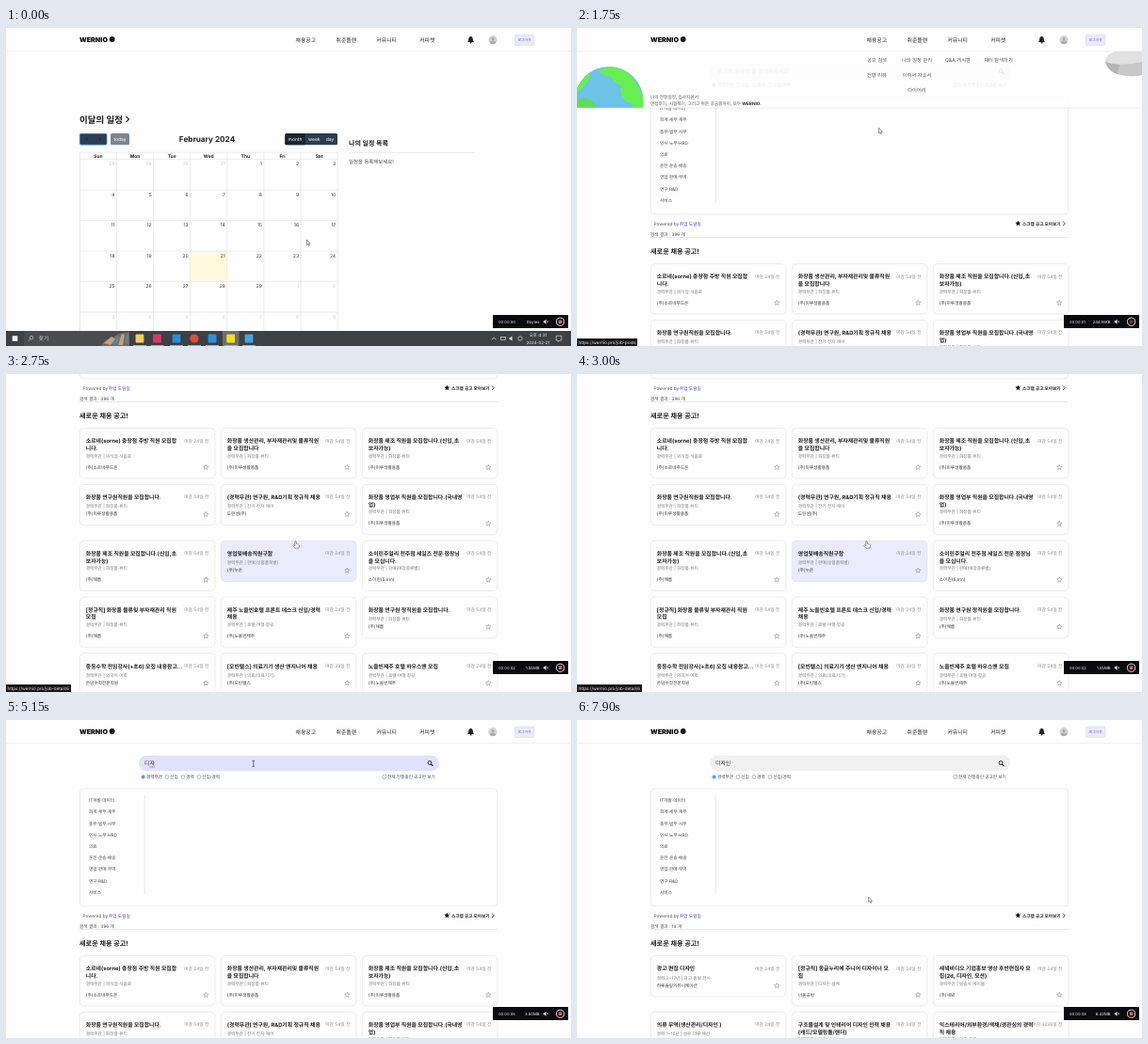
An HTML page for the animation above (8 s loop, 600x338 px).

```html
<!DOCTYPE html>
<html lang="ko">
<head>
<meta charset="utf-8">
<title>Job board walkthrough</title>
<style>
html, body { margin: 0; width: 100%; height: 100%; overflow: hidden; background: #fefefe; }
svg { display: block; width: 100vw; height: 100vh; }
text { font-family: Inter, 'Noto Sans CJK KR', 'Noto Sans CJK', sans-serif; white-space: pre; text-rendering: geometricPrecision; }
</style>
</head>
<body>
<svg id="stage" viewBox="0 0 600 338"></svg>
<script>
const LOOP = 8000, BRAND = 'WERNIO', SITE = 'https://wernio.pro/';
const stage = document.getElementById('stage');

// Drawing helpers
function add(parent, tag, attrs = {}) {
  const node = document.createElementNS('http://www.w3.org/2000/svg', tag);
  for (const k in attrs) node.setAttribute(k, attrs[k]);
  parent.appendChild(node);
  return node;
}
const group = (p, attrs) => add(p, 'g', attrs);
const rect = (p, x, y, width, height, fill, more) => add(p, 'rect', { x, y, width, height, fill, ...more });
const circle = (p, cx, cy, r, fill, more) => add(p, 'circle', { cx, cy, r, fill, ...more });
const path = (p, d, fill = 'none', more) => add(p, 'path', { d, fill, ...more });
const line = (p, d, stroke, width = 0.6) => path(p, d, 'none', { stroke, 'stroke-width': width });
// y is the middle of the line of text
function label(p, x, y, str, size, fill = '#333', weight = 400, anchor = 'start') {
  const node = add(p, 'text', { x, y: y + size * 0.37, 'font-size': size, fill, 'font-weight': weight, 'text-anchor': anchor });
  node.textContent = str;
  return node;
}
function star(p, cx, cy, r, fill, more) {
  const pts = Array.from({ length: 10 }, (_, i) => {
    const a = i * Math.PI / 5 - Math.PI / 2, q = i % 2 ? r * 0.48 : r;
    return (cx + q * Math.cos(a)).toFixed(2) + ',' + (cy + q * Math.sin(a)).toFixed(2);
  });
  return add(p, 'polygon', { points: pts.join(' '), fill, ...more });
}

// Timing helpers
const show = (node, on) => node.setAttribute('display', on ? 'inline' : 'none');
const move = (node, x, y) => node.setAttribute('transform', `translate(${x} ${y})`);
const held = (table, t) => table.filter(row => row[0] <= t).pop()[1];
const within = (t, a, b) => t >= a && t < b;
function eased(keys, t, col = 1) {
  const i = keys.findIndex(k => k[0] > t);
  if (i < 0) return keys[keys.length - 1][col];
  if (i === 0) return keys[0][col];
  const a = keys[i - 1], b = keys[i], u = (t - a[0]) / (b[0] - a[0]);
  return a[col] + (b[col] - a[col]) * u * u * (3 - 2 * u);
}

// Calendar page
const calendar = group(stage);
function buildCalendar(p) {
  label(p, 78, 97, '이달의 일정', 9.5, '#1a1a1a', 700);
  line(p, 'M127.5 94l3 3-3 3', '#222', 1.1);
  rect(p, 78.4, 112.3, 28.6, 11.8, '#2c3e50', { rx: 1.5, stroke: '#3f83bd', 'stroke-width': 0.9 });
  line(p, 'M86.5 116.5l-1.6 1.7 1.6 1.7M99 116.5l1.6 1.7-1.6 1.7', '#17222c', 0.8);
  rect(p, 111, 112, 20, 12.3, '#7d868f', { rx: 1.5 });
  label(p, 121, 118, 'today', 5, '#fff', 400, 'middle');
  label(p, 213.5, 118.3, 'February 2024', 8.2, '#222', 700, 'middle');
  rect(p, 296.3, 112, 55.7, 12.3, '#2c3e50', { rx: 1.5 });
  rect(p, 296.3, 112, 21.4, 12.3, '#1a252f', { rx: 1.5 });
  [['month', 307], ['week', 327.3], ['day', 344]].forEach(([s, x]) => label(p, x, 118, s, 5, '#fff', 400, 'middle'));

  const left = 78.4, cw = 39.1, top = 139.6, rh = 32.5;
  rect(p, left + 3 * cw, top + 3 * rh, cw, rh, '#fffadf');
  let grid = '';
  for (let c = 0; c < 8; c++) grid += `M${left + c * cw} 132.3V${top + 6 * rh}`;
  for (let r = 0; r < 7; r++) grid += `M${left} ${top + r * rh}h${7 * cw}`;
  line(p, grid + `M${left} 132.3h${7 * cw}`, '#dedede', 0.55);
  'Sun Mon Tue Wed Thu Fri Sat'.split(' ').forEach((d, c) =>
    label(p, left + (c + 0.5) * cw, 136, d, 4.9, '#222', 700, 'middle'));
  for (let i = 0; i < 42; i++) {
    const n = i - 3, inside = n > 0 && n < 30;
    const day = n < 1 ? 31 + n : inside ? n : n - 29;
    label(p, left + (i % 7 + 1) * cw - 2, top + Math.floor(i / 7) * rh + 4.6, day, 5, inside ? '#333' : '#cfcfcf', 400, 'end');
  }
  label(p, 364, 122, '나의 일정 목록', 7, '#1a1a1a', 700);
  line(p, 'M364 132.5h133', '#e2e2e2');
  label(p, 364, 142.5, '일정을 등록해보세요!', 5.4, '#444');
}
buildCalendar(calendar);

// Job search page
const jobs = group(stage);
const bar = rect(jobs, 141, 37.8, 319, 16.4, '#f0f0f0', { rx: 8.2 });
const typed = label(jobs, 147, 46, '', 5.9, '#333');
const composing = line(jobs, 'M158 50h5.4', '#444', 0.5);
const caret = line(jobs, 'M147.2 42.3v7.4', '#111', 0.6);
circle(jobs, 450, 45.5, 1.9, 'none', { stroke: '#111', 'stroke-width': 0.9 });
line(jobs, 'M451.4 46.9l2 2', '#111', 1.1);

function buildFilters(p) {
  [['경력무관', 145.6], ['신입', 171], ['경력', 188], ['신입/경력', 205]].forEach(([s, x], i) => {
    circle(p, x, 60.5, 1.9, '#fff', { stroke: i ? '#777' : '#1a73e8', 'stroke-width': 0.5 });
    if (!i) circle(p, x, 60.5, 1.2, '#1a73e8');
    label(p, x + 3.3, 60.5, s, 4.65, '#444');
  });
  rect(p, 400, 58.4, 3.8, 3.8, '#fff', { rx: 0.6, stroke: '#777', 'stroke-width': 0.5 });
  label(p, 405, 60.5, '현재 진행중인 공고만 보기', 4.65, '#444');
  rect(p, 78.4, 73, 443.4, 125, 'none', { rx: 4, stroke: '#e5e5e5', 'stroke-width': 0.7 });
  ['IT개발·데이터', '회계·세무·재무', '총무·법무·사무', '인사·노무·HRD', '의료', '운전·운송·배송', '영업·판매·무역', '연구·R&D', '서비스']
    .forEach((s, i) => label(p, 88, 85.5 + 12.2 * i, s, 4.7, '#444'));
  line(p, 'M147.2 80v105', '#dcdcdc');
  label(p, 81.5, 207.8, 'Powered by', 4.8, '#555');
  label(p, 109, 207.8, '취업 도람길', 4.7, '#4a3fd0', 500);
  star(p, 468.3, 207.7, 3, '#111');
  label(p, 473, 207.8, '스크랩 공고 모아보기', 4.65, '#222', 700);
  line(p, 'M516 205.5l2.2 2.3-2.2 2.3', '#222', 0.8);
  line(p, 'M78 222.6h444', '#dcdcdc', 0.6);
  label(p, 78, 237, '새로운 채용 공고!', 7.15, '#222', 700);
}
buildFilters(jobs);
const count = label(jobs, 78, 219.6, '', 4.7, '#444');

function buildCards(rows) {
  const g = group(jobs);
  const boxes = rows.map(([title, sub, firm, days], i) => {
    const card = group(g, { transform: `translate(${78.3 + i % 3 * 150} ${250.6 + Math.floor(i / 3) * 59.8})` });
    const lines = title.split('\n'), tall = lines.length > 1;
    const box = rect(card, 0, 0, 143.6, tall ? 53.3 : 43.5, '#fefefe', { rx: 4.5, stroke: '#e6e6e6', 'stroke-width': 0.7 });
    lines.forEach((s, n) => label(card, 6.5, 13.6 + n * 7.7, s, 5.85, '#1c1c1c', 700));
    label(card, 6.5, tall ? 29.2 : 23.2, sub, 4.65, '#777');
    label(card, 6.5, tall ? 41.2 : 31.2, firm, 4.7, '#333');
    label(card, 137, 13.2, `마감 ${days}일 전`, 4.75, '#888', 400, 'end');
    star(card, 134, tall ? 41.6 : 31.8, 2.8, 'none', { stroke: '#777', 'stroke-width': 0.5 });
    return box;
  });
  return { g, boxes };
}
const ANY = '경력무관 | ', BEAUTY = ANY + '화장품·뷰티', LIFE = '(주)미루생활용품', DAY = '(주)해름';
const all = buildCards([
  ['소르네(sorne) 충장점 주방 직원 모집합\n니다.', ANY + '외식업·식음료', '(주)소르네푸드온', 24],
  ['화장품 생산관리, 부자재관리및 물류직원\n을 모집합니다', BEAUTY, LIFE, 54],
  ['화장품 제조 직원을 모집합니다.(신입,초\n보자가능)', BEAUTY, LIFE, 54],
  ['화장품 연구원직원을 모집합니다.', BEAUTY, LIFE, 54],
  ['(경력무관) 연구원, R&D기획 정규직 채용', ANY + '전기·전자·제어', '도린셈(주)', 54],
  ['화장품 영업부 직원을 모집합니다.(국내영\n업)', BEAUTY, LIFE, 54],
  ['화장품 제조 직원을 모집합니다.(신입,초\n보자가능)', BEAUTY, DAY, 54],
  ['영업및배송직원구함', ANY + '판매(상품품목별)', '(주)누온', 24],
  ['소이린주얼리 전주점 세일즈 전문 점장님\n을 모십니다.', ANY + '판매(매장종류별)', '소이린(S.Irin)', 54],
  ['[정규직] 화장품 물류및 부자재관리 직원\n모집', BEAUTY, DAY, 54],
  ['제주 노을빈호텔 프론트 데스크 신입/경력\n채용', ANY + '호텔·여행·항공', '(주)노을빈제주', 24],
  ['화장품 연구원 정직원을 모집합니다.', BEAUTY, DAY, 54],
  ['중등수학 전임강사(+초6) 모집 내용참고...', ANY + '외국어·어학', '온담수학전문학원', 54],
  ['[모빈텔스] 의료기기 생산 엔지니어 채용', ANY + '의료(의료기기)', '(주)모빈텔스', 39],
  ['노을빈제주 호텔 하우스맨 모집', ANY + '호텔·여행·항공', '(주)노을빈제주', 24]
]);
const found = buildCards([
  ['광고 편집 디자인', '경력 2~17년 | 광고·홍보·전시', '하루솔잎커뮤니케이션', 24],
  ['[정규직] 몽글누리에 주니어 디자이너 모\n집', ANY + '디자인·설계', '너울공방', 24],
  ['새녘비디오 기업홍보 영상 후반편집자 모\n집(2d, 디자인, 모션)', ANY + '방송사·케이블', '(주)새녘', 24],
  ['의류 무역(생산관리/디자인 )', '경력 1~10년 | 섬유·의류·패션', '(주)가람결', 24],
  ['구조물설계 및 인테리어 디자인 인력 채용\n(캐드/모델링툴/렌더)', ANY + '건축·설비', '(주)온결', 24],
  ['익스테리어/외부환경/색채/경관심의 경력\n직 채용', ANY + '건축·환경', '(주)다온결', 3236]
]);

// Drop-down menu, under the header
const header = group(stage);
const menu = group(header);
function buildMenu(p) {
  add(add(p, 'clipPath', { id: 'menuClip' }), 'rect', { x: 0, y: 0, width: 600, height: 85 });
  add(add(p, 'clipPath', { id: 'globeClip' }), 'circle', { cx: 34, cy: 77.5, r: 36.5 });
  rect(p, 0, 25, 600, 60, '#fefefe');
  const art = group(group(p, { 'clip-path': 'url(#menuClip)' }), { 'clip-path': 'url(#globeClip)' });
  rect(art, -3, 40, 76, 76, '#5cbbe6');
  path(art, 'M34 40Q62 42 72 80V88H63Q60 80 52 78Q44 70 47 62Q40 58 36 52Q28 50 22 46Z', '#55ee3c');
  path(art, 'M-3 58Q5 50 13 46Q16 52 10 58Q7 65 0 68L-3 69Z', '#55ee3c');
  path(art, 'M-3 78Q6 72 14 76Q20 79 22 88H-3Z', '#4fd64a');
  // tilted stone-like solid on the right
  path(p, 'M561 36Q562 28 572 25H600V50Q588 53 574 49Q563 45 561 36Z', '#c2c2c2');
  path(p, 'M561 36Q576 41 600 36V25H572Q562 28 561 36Z', '#dedede');
  path(p, 'M561 36Q568 39 576 39L574 49Q563 45 561 36Z', '#adadad');
  [['공고 검색', 318.5, 0], ['전형 리뷰', 318.5, 1], ['나의 일정 관리', 361, 0], ['이력서·자소서', 361, 1],
   ['다이어리', 361, 2], ['Q&A 게시판', 404.3, 0], ['채티 탐색하기', 447.5, 0]]
    .forEach(([s, x, row]) => label(p, x, 34 + row * 16, s, 5.3, '#444', 400, 'middle'));
  label(p, 78, 73, '나의 전형일정, 입사지원서', 4.65, '#444');
  const claim = label(p, 78, 80.1, '면접후기, 시험복기, 그리고 취준 궁금증까지, 모두 ', 4.65, '#444');
  const name = add(claim, 'tspan', { 'font-weight': 700, fill: '#111' });
  name.textContent = BRAND + '.';
  line(p, 'M0 85h600', '#dcdcdc');
}
buildMenu(menu);

function buildHeader(p) {
  rect(p, 0, 0, 600, 24.8, '#fefefe');
  line(p, 'M0 24.8h600', '#e2e2e2');
  label(p, 78, 12, BRAND, 7.15, '#0c0c0c', 900);
  circle(p, 112.7, 12, 2.9, '#111');
  [['채용공고', 318.3], ['취준플랜', 361.3], ['커뮤니티', 404.2], ['커피챗', 447.3]]
    .forEach(([s, x]) => label(p, x, 12.6, s, 5.85, '#222', 400, 'middle'));
  path(p, 'M490 15q1.2-1.2 1.2-3.3q0-2.6 2.3-2.9q2.3.3 2.3 2.9q0 2.1 1.2 3.3Z', '#222');
  circle(p, 493.5, 15.7, 0.9, '#222');
  circle(p, 517, 12.7, 4.6, '#d3d3d3');
  circle(p, 517, 11.5, 1.6, '#a9a9a9');
  path(p, 'M513.8 15.7q.4-2.2 3.2-2.2t3.2 2.2q-3.2 2.4-6.4 0Z', '#a9a9a9');
  rect(p, 540.2, 7, 20.8, 11.6, '#ebebf8', { rx: 1.8, stroke: '#d8d7e8', 'stroke-width': 0.5 });
  label(p, 550.6, 12.7, '로그아웃', 3.9, '#6a5fe0', 400, 'middle');
}
buildHeader(header);

// Desktop layer: link hint, taskbar, recorder
const hint = group(stage);
const hintBox = rect(hint, 0, 330, 64, 8, '#161616');
const hintText = label(hint, 1.5, 334.2, '', 4.6, '#eee');

const taskbar = group(stage);
function buildTaskbar(p) {
  rect(p, 0, 322, 600, 16, '#3d4045');
  rect(p, 19, 322, 112, 16, '#4a4c50');
  rect(p, 6.7, 327.2, 5.6, 5.6, '#f4f4f4');
  circle(p, 27, 329.2, 1.8, 'none', { stroke: '#ddd', 'stroke-width': 0.6 });
  line(p, 'M25.8 330.6l-2 2.2', '#ddd');
  label(p, 34.5, 330, '찾기', 5.9, '#ccc');
  path(p, 'M101 338q4-9 12-8q4-6 18-7v15Z', '#7d6657');
  path(p, 'M104 335l8-7 5 3-6 6ZM119 337l4-12 3 1-2 11Z', '#c9a06f');
  path(p, 'M112 336l6-9 3 2-4 8ZM126 335l2-10h2v11Z', '#4d86ad');
  rect(p, 230, 322, 17.5, 16, '#6b6e72');
  const icons = [['#f3cf62', 142], ['#d93a63', 160.5], ['#2690d8', 181], ['#dd4b3a', 200, 1], ['#2b8fe0', 219], ['#f7dc1e', 238.7], ['#4ba3dd', 258]];
  icons.forEach(([fill, x, round]) => {
    if (round) circle(p, x, 330, 4.6, fill);
    else rect(p, x - 4.4, 325.6, 8.8, 8.8, fill, { rx: 1 });
    rect(p, x - 7, 337, 14, 1, '#76b9ed');
  });
  line(p, 'M516 331.2l2.2-2.2 2.2 2.2', '#eee', 0.7);
  rect(p, 525.5, 328.3, 5, 3.4, 'none', { stroke: '#eee', 'stroke-width': 0.6 });
  path(p, 'M534.5 329h1.3l1.7-1.6v5.2l-1.7-1.6h-1.3Z', '#eee');
  circle(p, 546, 330, 2.2, 'none', { stroke: '#eee', 'stroke-width': 0.6 });
  label(p, 565, 326.4, '오후 4:31', 4.6, '#f2f2f2', 400, 'middle');
  label(p, 565, 334, '2024-02-21', 4.4, '#f2f2f2', 400, 'middle');
  path(p, 'M584.3 327.2h5.6v4.8h-2l-1.6 1.6v-1.6h-2Z', 'none', { stroke: '#eee', 'stroke-width': 0.6 });
}
buildTaskbar(taskbar);

const recorder = group(stage);
rect(recorder, 517, 305, 80, 14, '#0b0b0f');
const clock = label(recorder, 523, 312.2, '', 4.1, '#f2f2f2');
const size = label(recorder, 566.6, 312.2, '', 4.3, '#f2f2f2', 400, 'end');
path(recorder, 'M570.8 311.2h1.1l1.6-1.5v5l-1.6-1.5h-1.1Z', '#f2f2f2');
line(recorder, 'M574.3 311.2l1.8 2M576.1 311.2l-1.8 2', '#f2f2f2', 0.5);
circle(recorder, 588.6, 312.2, 4.1, 'none', { stroke: '#f2f2f2', 'stroke-width': 0.9 });
const lamp = rect(recorder, 586.9, 310.5, 3.4, 3.4, '#e0616a', { rx: 0.5 });

// Pointers
const pointer = group(stage);
const outline = { stroke: '#333', 'stroke-width': 0.5, 'stroke-linejoin': 'round' };
const pointers = {
  arrow: path(pointer, 'M0 0V5.6L1.3 4.5 2.2 6.5 3.1 6.1 2.2 4.2H3.9Z', '#fff', outline),
  hand: path(pointer, 'M-.7.6Q0-.4.7.6V3L3.2 3.7Q4 4 3.8 5L3.2 7.6H-.8L-2.8 4.8Q-2.4 3.9-1.6 4.4L-.7 5.1Z', '#fff', outline),
  beam: line(pointer, 'M-1.3-3H1.3M0-3V3M-1.3 3H1.3', '#222', 0.6)
};

// Time tables
const POINTER = [[0, 319.3, 225], [80, 319.3, 225], [580, 318, 12], [720, 318, 12], [850, 319, 33], [1500, 319, 33],
  [1750, 320.5, 106.2], [2000, 320.5, 106.2], [2300, 307.6, 177.5], [3650, 307.6, 177.5], [3900, 262.8, 46.3],
  [5500, 262.8, 46.3], [6150, 451.7, 45.3], [7620, 451.7, 45.3], [7850, 309.6, 188]];
const SHAPE = [[0, 'arrow'], [500, 'hand'], [1600, 'arrow'], [2650, 'hand'], [3100, 'arrow'], [3850, 'beam'], [6050, 'hand'], [7680, 'arrow']];
const SCROLL = [[1950, 0], [2350, 101.5], [2650, 193], [3080, 193], [3480, 0]];
const MENU = [[450, 0], [650, 1], [1680, 1], [1750, 0.89], [1950, 0]];
const FOCUS = [[3980, 0], [4180, 1], [6500, 1], [6700, 0]];
const TYPING = [[0, ''], [4500, 'ㄷ'], [4650, '디'], [4800, '딪'], [4950, '디자'], [5200, '디장'], [5350, '디자이'], [5500, '디자인']];
const SIZE = [[0, '0bytes'], [700, '64.20KB'], [1200, '128.52KB'], [1600, '244.16KB'], [2050, '0.76MB'], [2300, '1.08MB'],
  [2700, '1.55MB'], [3250, '2.03MB'], [3700, '2.65MB'], [4300, '3.12MB'], [4800, '3.50MB'], [5350, '4.07MB'],
  [5850, '4.51MB'], [6350, '4.94MB'], [6900, '5.58MB'], [7400, '6.02MB'], [7800, '6.42MB']];
const LAMP = [[0, 1], [950, 0.5], [2700, 1], [7150, 0.5], [7400, 1]];

function draw(t) {
  const onJobs = t >= 920, results = t >= 7380, scroll = eased(SCROLL, t);
  show(calendar, !onJobs);
  show(jobs, onJobs);
  show(all.g, t >= 1250 && !results);
  show(found.g, results);
  count.textContent = `검색 결과 : ${results ? 14 : t < 1250 ? 0 : 396} 개`;
  move(jobs, 0, -scroll);
  move(header, 0, -scroll);

  const open = eased(MENU, t);
  show(menu, open > 0);
  menu.setAttribute('opacity', open);

  const over = within(t, 2680, 3080);
  all.boxes[7].setAttribute('fill', over ? '#ecebfd' : '#fefefe');
  all.boxes[7].setAttribute('stroke', over ? '#e0dff3' : '#e6e6e6');

  const f = eased(FOCUS, t), mix = (a, b) => Math.round(a + (b - a) * f);
  bar.setAttribute('fill', `rgb(${mix(240, 225)},${mix(240, 225)},${mix(240, 252)})`);
  const word = held(TYPING, t);
  typed.textContent = word || "'공고명/회사명'을 검색해주세요!";
  typed.setAttribute('fill', word ? '#333' : '#777');
  show(composing, within(t, 4500, 6500));
  move(composing, (word.length - 3) * 5.43, 0);
  show(caret, within(t, 3900, 4500) && (t - 3900) % 1000 < 500);

  const link = within(t, 800, 1800) ? 'job-posts' : over ? 'job-detail/6' : '';
  show(hint, link);
  hintText.textContent = SITE + link;
  hintBox.setAttribute('width', over ? 69 : 64);

  move(taskbar, 0, eased([[120, 0], [320, 17]], t));
  clock.textContent = '00:00:0' + Math.max(0, Math.floor((t * 1.03 - 100) / 1000));
  size.textContent = held(SIZE, t);
  lamp.setAttribute('opacity', held(LAMP, t));

  move(pointer, eased(POINTER, t, 1), eased(POINTER, t, 2));
  const shape = held(SHAPE, t);
  for (const k in pointers) show(pointers[k], k === shape);
}

function tick() {
  draw(performance.now() % LOOP);
  requestAnimationFrame(tick);
}
tick();
</script>
</body>
</html>
```
